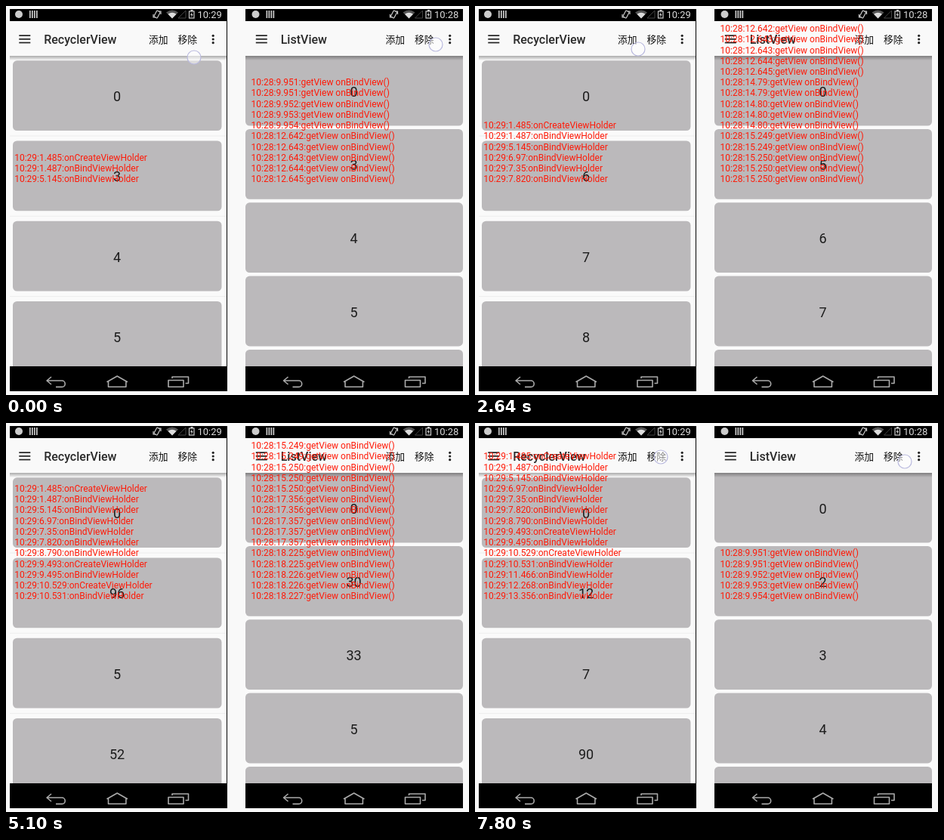
An HTML page for the animation above (8000 ms loop, 613 by 515 pixels).

```html
<!DOCTYPE html>
<html lang="zh">
<head>
<meta charset="utf-8">
<title>RecyclerView / ListView</title>
<style>
  html, body { margin: 0; width: 100%; height: 100%; overflow: hidden; background: #f9f9f9; }
  svg { display: block; }
  text { font-family: Roboto, "Noto Sans CJK SC", "Noto Sans CJK", sans-serif; fill: #1c1c1c; }
  .title { font-size: 16px; font-weight: 500; fill: #2a2a2a; }
  .action { font-size: 12.8px; font-weight: 500; font-family: "Noto Sans CJK SC", "Noto Sans CJK", sans-serif; fill: #111; }
  .num { font-size: 18px; text-anchor: middle; }
  .log text { font-size: 12px; fill: #ff1a08; }
  .clock { font-size: 13px; fill: #ddd; }
  .card { fill: #bbb9bb; }
  .nav { fill: none; stroke: #aaa; stroke-width: 1.6; stroke-linejoin: round; }
  .touch { fill: #fff; fill-opacity: .5; stroke: #b9b9de; stroke-width: 1.2; }
</style>
</head>
<body>
<svg id="stage" width="613" height="515" viewBox="0 0 613 515">
  <defs>
    <linearGradient id="shade" x2="0" y2="1">
      <stop offset="0" stop-opacity=".32"/><stop offset="1" stop-opacity="0"/>
    </linearGradient>
  </defs>
</svg>
<script>
const LOOP = 8000, SHIFT = 313.5, NONE = -1, ADD = 0, REMOVE = 1, HOLD = 1e5;
const stage = document.getElementById('stage');

const create = 'onCreateViewHolder', bind = 'onBindViewHolder';
const recyclerLog = '1.485+ 1.487 5.145 6.97 7.35 7.820 8.790 9.493+ 9.495 10.529+ 10.531 11.466 12.268 13.356'
  .split(' ').map(s => '10:29:' + s.replace('+', '') + ':' + (s.endsWith('+') ? create : bind));

const listLog = ['9 951 951 952 953 954', '12 642 643 643 644 645', '14 79 79 80 80 80',
  '15 249 249 250 250 250', '17 356 356 357 357 357', '18 225 225 226 226 227']
  .flatMap(s => {
    const [sec, ...ms] = s.split(' ');
    return ms.map(m => `10:28:${sec}.${m}:getView onBindView()`);
  });

// states: [time, numbers, log length]; taps: [down, up, x, y, button]
const panels = [
  {
    x: 5, dx: 0, title: 'RecyclerView', clock: '10:29', log: recyclerLog, logX: 11.2,
    cardX: 9, cardW: 276.5, top: 72.3, pitch: 106.2, count: 4, mid: 47.5,
    states: [
      [0, '0 3 4 5', 3], [840, '0 4 5 6', 4], [1740, '0 5 6 7', 5], [2280, '0 6 7 8', 6],
      [3180, '0 52 6 7', 7], [3960, '0 5 52 6', 9], [4920, '0 96 5 52', 11],
      [5820, '0 90 96 5', 12], [6540, '0 7 90 96', 13], [7560, '0 12 7 90', 14]
    ],
    taps: [
      [-1, 0, 249, 68, NONE], [120, 840, 250, 50, REMOVE], [1440, 1740, 250, 50, REMOVE],
      [1860, 2280, 250, 50, REMOVE], [2640, 3180, 216, 57, ADD], [3480, 3960, 216, 57, ADD],
      [4440, 4920, 213, 58, ADD], [5220, 5820, 214, 56, ADD], [6060, 6540, 210, 46, ADD],
      [6720, 7560, 210, 46, ADD], [7800, HOLD, 246, 45, NONE]
    ]
  },
  {
    x: 317, dx: SHIFT, title: 'ListView', clock: '10:28', log: listLog, logX: 324.6,
    cardX: 317, cardW: 288, top: 65.7, pitch: 97.3, count: 5, mid: 47.5,
    states: [
      [0, '0 3 4 5', 10], [840, '0 4 5 6', 15], [2280, '0 5 6 7', 20],
      [4080, '0 33 5 6', 25], [4920, '0 30 33 5', 30], [6480, '0 2 3 4', 5]
    ],
    taps: [
      [-1, 0, 569, 51, NONE], [120, 840, 561, 50, REMOVE], [1440, 2280, 561, 50, REMOVE],
      [3480, 3960, 514, 45, NONE], [3960, 4080, 514, 45, ADD], [4440, 4920, 514, 45, ADD],
      [5220, 5820, 514, 53, ADD], [6480, 6360, 562, 54, NONE], [6540, HOLD, 569, 51, NONE]
    ]
  }
];

const rect = (x, y, w, h, fill, more = '') =>
  `<rect x="${x}" y="${y}" width="${w}" height="${h}" fill="${fill}" ${more}/>`;
const times = (n, f) => Array.from({ length: n }, (_, i) => f(i)).join('');

function cards(p) {
  return times(p.count, i => {
    const y = p.top + i * p.pitch;
    const top = p.dx && !i ? y - 10 : y;
    const end = Math.min(y + 92.8, 490);
    const line = p.dx || !i ? '' : rect(5, y - 7, 287, 1, '#eee');
    return line + `<rect class="card" x="${p.cardX}" y="${top}" width="${p.cardW}" height="${end - top}" rx="5.5"/>` +
      `<text class="num" x="${147 + p.dx}" y="${y + p.mid + 6.4}"></text>`;
  });
}

const statusIcons = `
  <circle cx="17" cy="11" r="5" fill="#ccc"/>
  ${times(4, i => rect(31 + i * 3, 6, 1.7, 10, '#ccc'))}
  <g fill="none" stroke="#ccc" stroke-width="1.2">
    <rect x="197.5" y="6.5" width="5" height="9" rx="1" transform="rotate(28 200 11)"/>
    <path d="M195 11v4h3M205 11v-4h-3"/>
    <rect x="242.5" y="7" width="6.5" height="9"/>
  </g>
  <path d="M212 8.5q8 -6 16 0l-8 8z" fill="#555"/>
  <path d="M214.5 10.8q5.500 -4 11 0l-5.500 5.700z" fill="#ddd"/>
  <path d="M238 6v10h-10z" fill="none" stroke="#444"/>
  <path d="M244.500 5h3v2h-3zM246.500 8l-2.500 4h1.700l-.7 3 2.700-4h-1.700z" fill="#ccc"/>`;

const navIcons = `<g class="nav">
  <path d="M60 491l-6 5 6 5M54 496h20a4.200 4.200 0 0 1 0 8.400h-8"/>
  <path d="M134 497.500l13.200-7.500 13.200 7.500h-1.500v6.700h-23.400v-6.700z"/>
  <path d="M215 495.500h20v8.700h-20zM220 493v-2h21.500v8.500h-4"/>
</g>`;

function build(p) {
  const g = document.createElementNS('http://www.w3.org/2000/svg', 'g');
  g.innerHTML = `
    ${rect(p.x, 20, 288, 457, '#fafafa')}
    ${cards(p)}
    ${rect(p.x, 66, 288, 6, 'url(#shade)')}
    ${rect(p.x, 4, 288, 16, '#000')}
    ${rect(p.x, 20, 288, 46, '#f9f9f9')}
    ${rect(0, 24, 39, 39, '#e2e2e2', 'class="press"')}
    ${rect(p.x, 477, 288, 33, '#000')}
    ${p.dx ? '' : rect(292, 4, 1, 506, '#000')}
    <g transform="translate(${p.dx})">
      ${statusIcons}
      <text class="clock" x="253.500" y="15.800">${p.clock}</text>
      ${times(3, i => rect(17.3, 38.300 + i * 4.700, 15, 1.700, '#222'))}
      <text class="title" x="50.200" y="49.700">${p.title}</text>
      <text class="action" x="189" y="48.700">添加</text>
      <text class="action" x="227.500" y="48.700">移除</text>
      ${times(3, i => `<circle cx="274.200" cy="${39.300 + i * 4.700}" r="1.600" fill="#222"/>`)}
      ${navIcons}
    </g>
    <g class="log">${times(15, i => `<text x="${p.logX}" y="${233.2 - i * 14.22}"></text>`)}</g>
    <circle class="touch" r="9"/>`;
  stage.append(g);
  p.nums = g.querySelectorAll('.num');
  p.lines = g.querySelectorAll('.log text');
  p.press = g.querySelector('.press');
  p.touch = g.querySelector('.touch');
}

const latest = (rows, t) => rows.filter(r => r[0] <= t).pop();

function update(p, t) {
  const state = latest(p.states, t);
  if (state !== p.state) {
    p.state = state;
    const nums = state[1].split(' ');
    p.nums.forEach((el, i) => el.textContent = nums[i] || '');
    p.lines.forEach((el, i) => el.textContent = p.log[state[2] - 1 - i] || '');
  }
  const [down, up, x, y, button] = latest(p.taps, t);
  const held = button !== NONE && t >= down + 60 && t < up + 60;
  p.press.setAttribute('visibility', held ? 'visible' : 'hidden');
  p.press.setAttribute('x', (p.dx ? 495 : 182) + 39 * button);
  p.touch.setAttribute('cx', x);
  p.touch.setAttribute('cy', y);
  p.touch.setAttribute('opacity', Math.max(0, Math.min(1, 1 - (t - up - 60) / 120)));
}

panels.forEach(build);
stage.insertAdjacentHTML('beforeend', `<g id="size">${rect(317, 16, 46, 9, '#0a0f1c')}
  <text x="317" y="23.500" style="font-size:9.500px;fill:#d5e2f5">x963(50%)</text></g>`);
const size = document.getElementById('size');

const start = performance.now();
function frame() {
  const t = (performance.now() - start) % LOOP;
  panels.forEach(p => update(p, t));
  size.setAttribute('visibility', t >= 6480 && t < 6960 ? 'visible' : 'hidden');
  requestAnimationFrame(frame);
}
frame();
</script>
</body>
</html>
```
